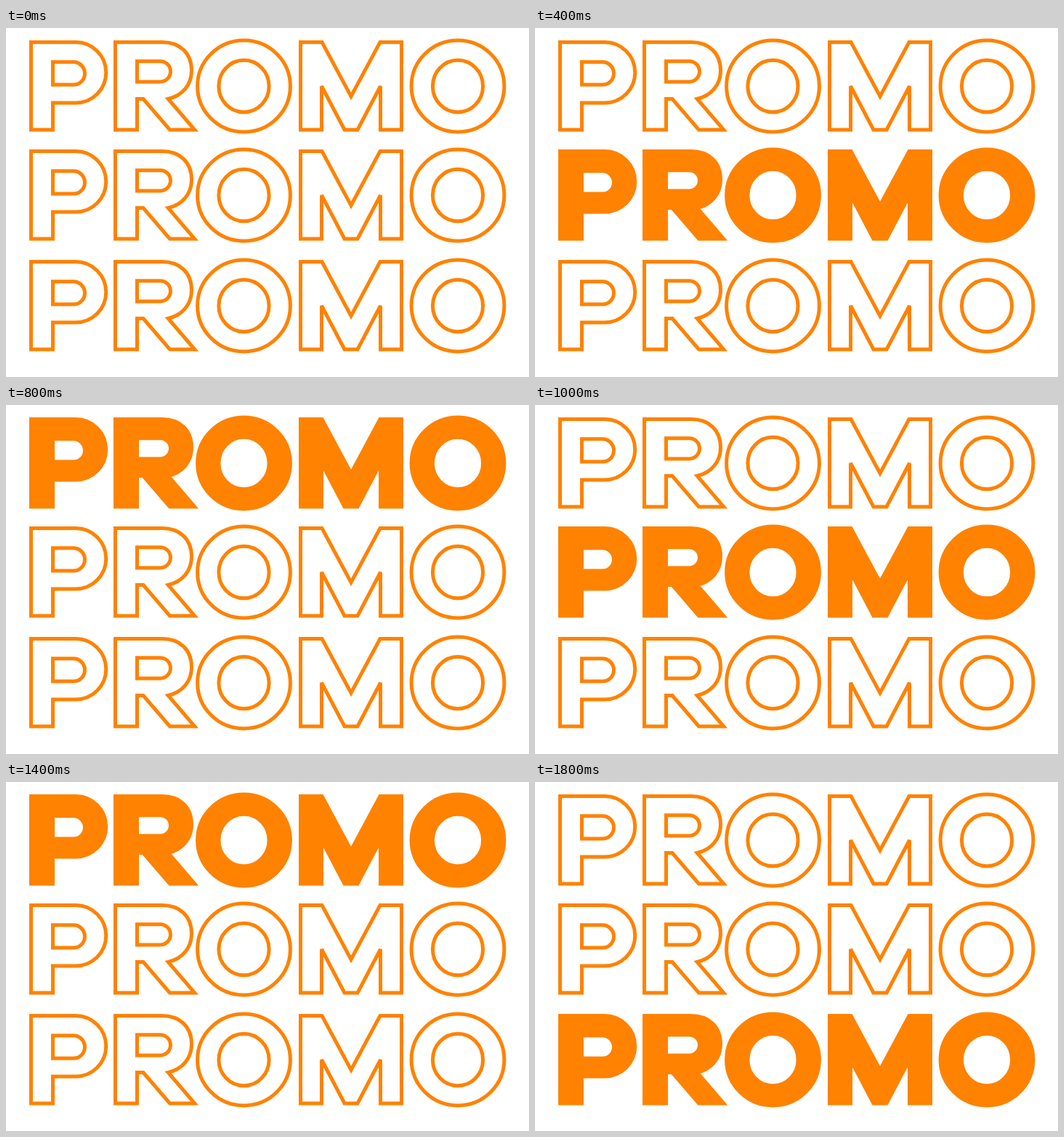
An HTML page that plays this animation: 720x480 px, repeating every 2000 ms.

```html
<!DOCTYPE html>
<html lang="en">
<head>
<meta charset="utf-8">
<title>Promo</title>
<style>
  html, body { margin: 0; width: 100%; height: 100%; overflow: hidden; background: #fff; }
  svg { display: block; width: 720px; height: 480px; }
  .row { fill: none; stroke: #ff8200; stroke-width: 5; stroke-miterlimit: 3.5; fill-rule: evenodd; }
  .row.solid { fill: #ff8200; }
</style>
</head>
<body>
<svg viewBox="0 0 720 480" role="img" aria-label="PROMO PROMO PROMO"></svg>
<script>
const LOOP = 2000, STEP = 200;
const ROW_Y = [0, 150, 302];
const svg = document.querySelector('svg');

const oval = (cx, cy, rx, ry) =>
  `M${cx - rx} ${cy}a${rx} ${ry} 0 1 1 ${2 * rx} 0a${rx} ${ry} 0 1 1 ${-2 * rx} 0Z`;

// Counter with a flat left side and a round right end
const counter = (left, right, top, bottom) => {
  const r = (bottom - top) / 2;
  return `M${left} ${top}H${right - r}a${r} ${r} 0 0 1 0 ${2 * r}H${left}Z`;
};

const letterO = cx => oval(cx, 80, 63.9, 62.9) + oval(cx, 80, 34.6, 35.8);

const letterP = 'M34.5 19.5H96a41.75 41.75 0 0 1 0 83.5H64.5V140H34.5Z' +
  counter(64.5, 108.5, 46.8, 78);

const letterR = 'M150.5 19.5H215C239 19.5 255.5 34 255.5 58.5' +
  'C255.5 78 243 93 223.2 97.5L259.7 140H225.5L189 97.5H180.5V140H150.5Z' +
  counter(180.5, 226.5, 45.7, 74);

const letterM = 'M405.5 19.5H435L475 94L515 19.5H544.5V140H515.5V80' +
  'L484 140H466L434.5 80V140H405.5Z';

const word = letterP + letterR + letterO(327.5) + letterM + letterO(622);

const rows = ROW_Y.map(y => {
  const path = document.createElementNS('http://www.w3.org/2000/svg', 'path');
  path.setAttribute('d', word);
  path.setAttribute('transform', `translate(0 ${y})`);
  svg.appendChild(path);
  return path;
});

// Every row is hollow on the first step, then one is solid at a time
function draw(ms) {
  const step = Math.floor((ms % LOOP) / STEP);
  const solid = step ? (step - 1) % rows.length : -1;
  rows.forEach((row, i) => row.setAttribute('class', i === solid ? 'row solid' : 'row'));
}

const start = performance.now();
function tick() {
  draw(performance.now() - start);
  requestAnimationFrame(tick);
}
tick();
</script>
</body>
</html>
```
